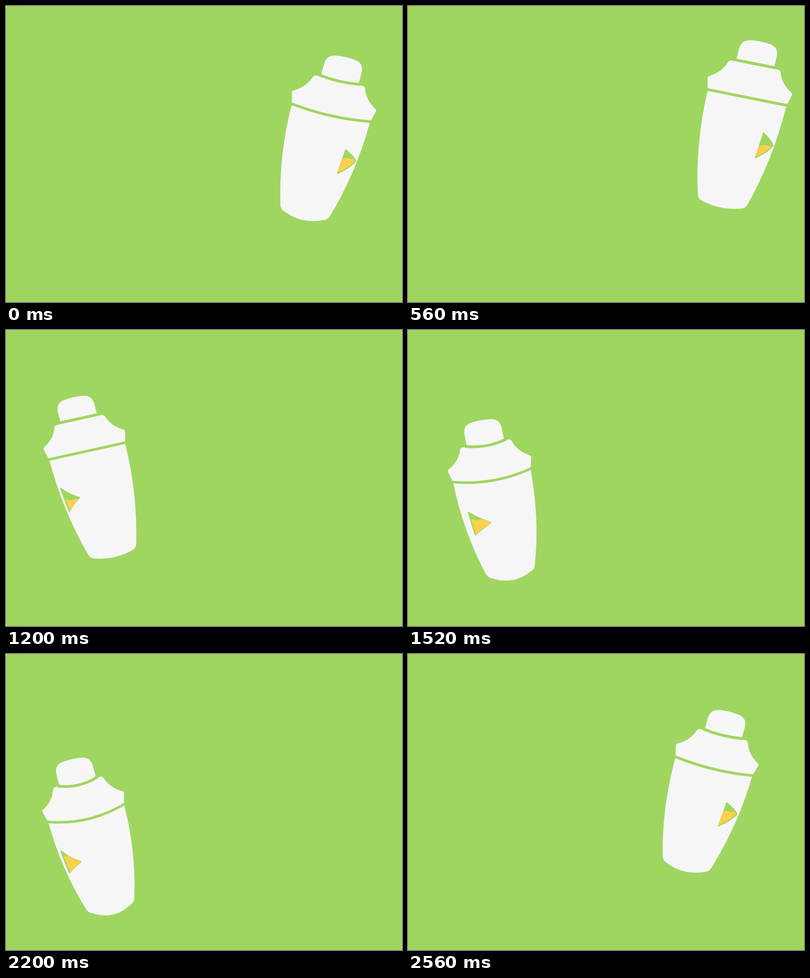
Animation, 800 px wide and 600 px high, one loop 2.6 s. Source, as an HTML page with a canvas:

```html
<!DOCTYPE html>
<html lang="en">
<head>
<meta charset="utf-8">
<title>Shaker</title>
<style>
  html, body { margin: 0; width: 100%; height: 100%; overflow: hidden; background: #9fd660; }
  canvas { display: block; }
</style>
</head>
<body>
<canvas id="stage" width="800" height="600"></canvas>
<script>
const ctx = document.getElementById('stage').getContext('2d');
const GREEN = '#9fd660', WHITE = '#f6f6f6', YELLOW = '#fcd04b';
const STEP = 40, COUNT = 65;
const RAD = Math.PI / 180;

// step, seam x, seam y, lean in degrees, size, rim curve, window turn in degrees
const POSES = [
  [0, 656, 219, 12.8, 1, 6, 56],
  [2, 684, 206, 12.3, 1, 3, 57],
  [8, 651, 281, 15, .98, 11, 54],
  [14, 684.5, 188, 11.4, 1, 0, 57],
  [15.5, 690, 181, 11.2, 1, 0, 57],
  [22, 683, 301, 19.6, .957, 14, 56],
  [24, 605, 325, 13, .96, 14, 35],
  [26, 440, 315, 1, .965, 10, 0],
  [28, 271, 280, -8, .967, 4, -33],
  [30, 164.5, 248, -12.5, .967, 0, -50],
  [32, 150, 222, -13, .967, 0, -52],
  [39.5, 172, 306, -9.5, .98, 12, -32],
  [46, 166, 255, -10.9, .98, 7.5, -37],
  [49, 150, 222, -12.5, .975, 2, -48],
  [55, 162.5, 325, -13.2, .97, 13, -47],
  [57, 225, 336, -11, .97, 13, -35],
  [60, 400, 305, 1, .975, 10, 5],
  [64, 617.5, 230, 13.8, .985, 6, 54]
];

function poseAt(index) {
  const n = POSES.length, lap = Math.floor(index / n);
  const [step, ...rest] = POSES[index - lap * n];
  return [step + lap * COUNT, ...rest];
}

// Smooth interpolation that never overshoots a pose.
function interpolate(step) {
  let i = 0;
  while (poseAt(i + 1)[0] <= step) i++;
  const [p, a, b, q] = [-1, 0, 1, 2].map(d => poseAt(i + d));
  const span = b[0] - a[0], s = (step - a[0]) / span;
  const slope = (m, n, j) => (n[j] - m[j]) / (n[0] - m[0]);
  const tangent = (l, r) => l * r > 0 ? 2 * l * r / (l + r) : 0;
  return [1, 2, 3, 4, 5, 6].map(j => {
    const mid = slope(a, b, j);
    const ta = tangent(slope(p, a, j), mid) * span;
    const tb = tangent(mid, slope(b, q, j)) * span;
    const d = b[j] - a[j];
    return a[j] + s * (ta + s * (3 * d - 2 * ta - tb + s * (ta + tb - 2 * d)));
  });
}

function bodyPath(curve, height) {
  const p = new Path2D();
  p.moveTo(-81, 0);
  p.quadraticCurveTo(0, 2 * curve, 81, 0);
  p.quadraticCurveTo(80.2, height / 2, 51, height - 6);
  p.quadraticCurveTo(48, height + 1, 42, height + 3);
  p.quadraticCurveTo(0, height + 16 + curve, -42, height + 3);
  p.quadraticCurveTo(-48, height + 1, -51, height - 6);
  p.quadraticCurveTo(-80.2, height / 2, -81, 0);
  return p;
}

function lidPath(curve) {
  const p = new Path2D();
  p.moveTo(-82, -5.5);
  p.lineTo(-87, -25);
  p.quadraticCurveTo(-88, -29, -83, -31);
  p.quadraticCurveTo(-61, -44, -54, -66);
  p.quadraticCurveTo(-52, -70, -48, -70);
  p.lineTo(48, -70);
  p.quadraticCurveTo(52, -70, 54, -66);
  p.quadraticCurveTo(61, -44, 83, -31);
  p.quadraticCurveTo(88, -29, 87, -25);
  p.lineTo(82, -5.5);
  p.quadraticCurveTo(0, 2 * curve - 5.5, -82, -5.5);
  return p;
}

function capPath(curve) {
  const base = -75.5 + .2 * curve, p = new Path2D();
  p.moveTo(-39, base);
  p.lineTo(-39, -97);
  p.quadraticCurveTo(-38, -116, -18, -118);
  p.quadraticCurveTo(0, -120, 18, -118);
  p.quadraticCurveTo(38, -116, 39, -97);
  p.lineTo(39, base);
  p.quadraticCurveTo(0, base + curve, -39, base);
  return p;
}

// Triangular window wrapped around the body.
function windowPath(turn, curve, squash) {
  const corners = [[-18, 62, 0], [18, 87, 1], [-18, 113, 0]];
  const p = new Path2D(), parts = 10;
  corners.forEach((from, i) => {
    const to = corners[(i + 1) % 3];
    for (let n = 0; n < parts; n++) {
      const [a, v, tip] = from.map((f, j) => f + (to[j] - f) * n / parts);
      const angle = (turn + a) * RAD;
      const radius = 81 - .0074 * v - .000666 * v * v;
      p.lineTo(radius * Math.sin(angle),
        v * squash + curve * Math.cos(angle) - 4 * tip * Math.sin(angle));
    }
  });
  p.closePath();
  return p;
}

function drawLiquid(pane, turn, step, squash) {
  const centre = ctx.getTransform().transformPoint(
    new DOMPoint(74 * Math.sin(turn * RAD), 88 * squash));
  const level = centre.y - 2 - 3.5 * Math.cos(2 * Math.PI * step / COUNT);
  ctx.translate(-Math.sign(turn) * 1.3, 0);
  ctx.clip(pane);
  ctx.resetTransform();
  ctx.beginPath();
  for (let dx = -50; dx <= 50; dx += 2) {
    ctx.lineTo(centre.x + dx, level + 1.3 * Math.sin(dx * .25 + step * .9));
  }
  ctx.lineTo(centre.x + 50, level + 80);
  ctx.lineTo(centre.x - 50, level + 80);
  ctx.fillStyle = YELLOW;
  ctx.fill();
}

function draw(step) {
  const [x, y, lean, size, curve, turn] = interpolate(step);
  const squash = 1 - .0058 * curve;
  ctx.resetTransform();
  ctx.fillStyle = GREEN;
  ctx.fillRect(0, 0, 800, 600);

  ctx.save();
  ctx.translate(x, y);
  ctx.rotate(lean * RAD);
  ctx.transform(1, 0, -.034 * turn / 55, 1, 0, 0);
  ctx.scale(size, size);

  ctx.fillStyle = WHITE;
  ctx.fill(bodyPath(curve, 217 * squash));
  ctx.fill(lidPath(curve));
  ctx.fill(capPath(curve));

  ctx.strokeStyle = ctx.fillStyle = GREEN;
  ctx.lineCap = ctx.lineJoin = 'round';
  ctx.lineWidth = 5.5;
  const groove = -72.7 + .2 * curve;
  ctx.beginPath();
  ctx.moveTo(-41, groove);
  ctx.quadraticCurveTo(0, groove + curve, 41, groove);
  ctx.stroke();

  const pane = windowPath(turn, curve, squash);
  ctx.lineWidth = 3;
  ctx.fill(pane);
  ctx.stroke(pane);
  drawLiquid(pane, turn, step, squash);
  ctx.restore();
}

const start = performance.now();
function tick() {
  draw(Math.floor((performance.now() - start) / STEP) % COUNT);
  requestAnimationFrame(tick);
}
tick();
</script>
</body>
</html>
```
